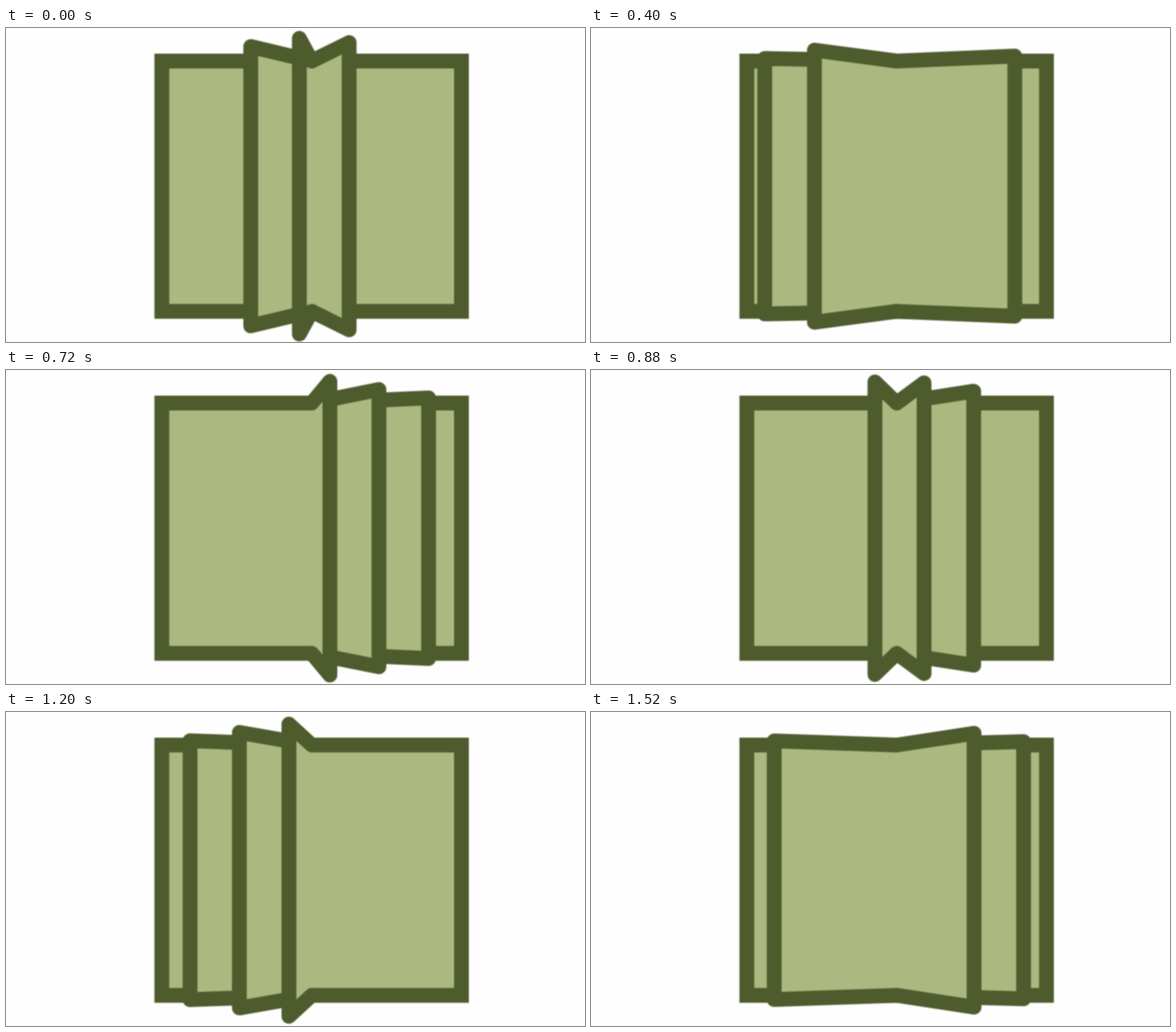
Write an HTML page with a canvas that moves like this. It is 1017 px wide and 551 px high and loops after 1.6 s.

```html
<!DOCTYPE html>
<html lang="en">
<head>
<meta charset="utf-8">
<title>Turning pages</title>
<style>
  html, body { margin: 0; width: 100%; height: 100%; overflow: hidden; background: #fefefe; }
  canvas { display: block; filter: blur(1.1px); }
</style>
</head>
<body>
<canvas id="stage" width="1017" height="551"></canvas>
<script>
const ctx = document.getElementById('stage').getContext('2d');

const LOOP = 1600, HOLD = 80;
const RATE = 2.4;        // turn steps per picture
const TURN = 30;         // steps in one full page turn
const STEP = 17.5;       // sideways travel per step
const BOOK = { left: 273.7, right: 800, top: 58, bottom: 497.2 };
const SPINE = 537;
const APEX = 14.5, SLOPE = 0.168;

// phase: head start in steps; start and drift: where a turn begins on the right
const PAGES = [
  { phase: 21, start: 797.4, drift: 0.045 },
  { phase: 16, start: 795.3, drift: 0.01 },
  { phase: 11, start: 795.2, drift: 0.02 }
];

function pageX(page, step) {
  return page.start - page.drift * step - STEP * ((step + page.phase) % TURN);
}

function drawPage(x) {
  const top = APEX + SLOPE * Math.abs(x - SPINE);
  ctx.beginPath();
  ctx.moveTo(SPINE, BOOK.top);
  ctx.lineTo(x, top);
  ctx.lineTo(x, BOOK.top + BOOK.bottom - top);
  ctx.lineTo(SPINE, BOOK.bottom);
  ctx.fill();
  ctx.stroke();
}

function draw(time) {
  const step = Math.round(Math.floor((time % LOOP) / HOLD) * RATE);
  ctx.fillStyle = '#fefefe';
  ctx.fillRect(0, 0, 1017, 551);

  ctx.fillStyle = '#abb980';
  ctx.strokeStyle = '#4e5b2d';
  ctx.lineWidth = 26;
  ctx.lineCap = 'round';
  ctx.lineJoin = 'miter';
  ctx.beginPath();
  ctx.rect(BOOK.left, BOOK.top, BOOK.right - BOOK.left, BOOK.bottom - BOOK.top);
  ctx.fill();
  ctx.stroke();

  // The page nearest the spine lies on top
  ctx.lineJoin = 'round';
  PAGES.map(page => pageX(page, step))
    .sort((a, b) => Math.abs(b - SPINE) - Math.abs(a - SPINE))
    .forEach(drawPage);
}

function tick() {
  draw(performance.now());
  requestAnimationFrame(tick);
}
tick();
</script>
</body>
</html>
```
